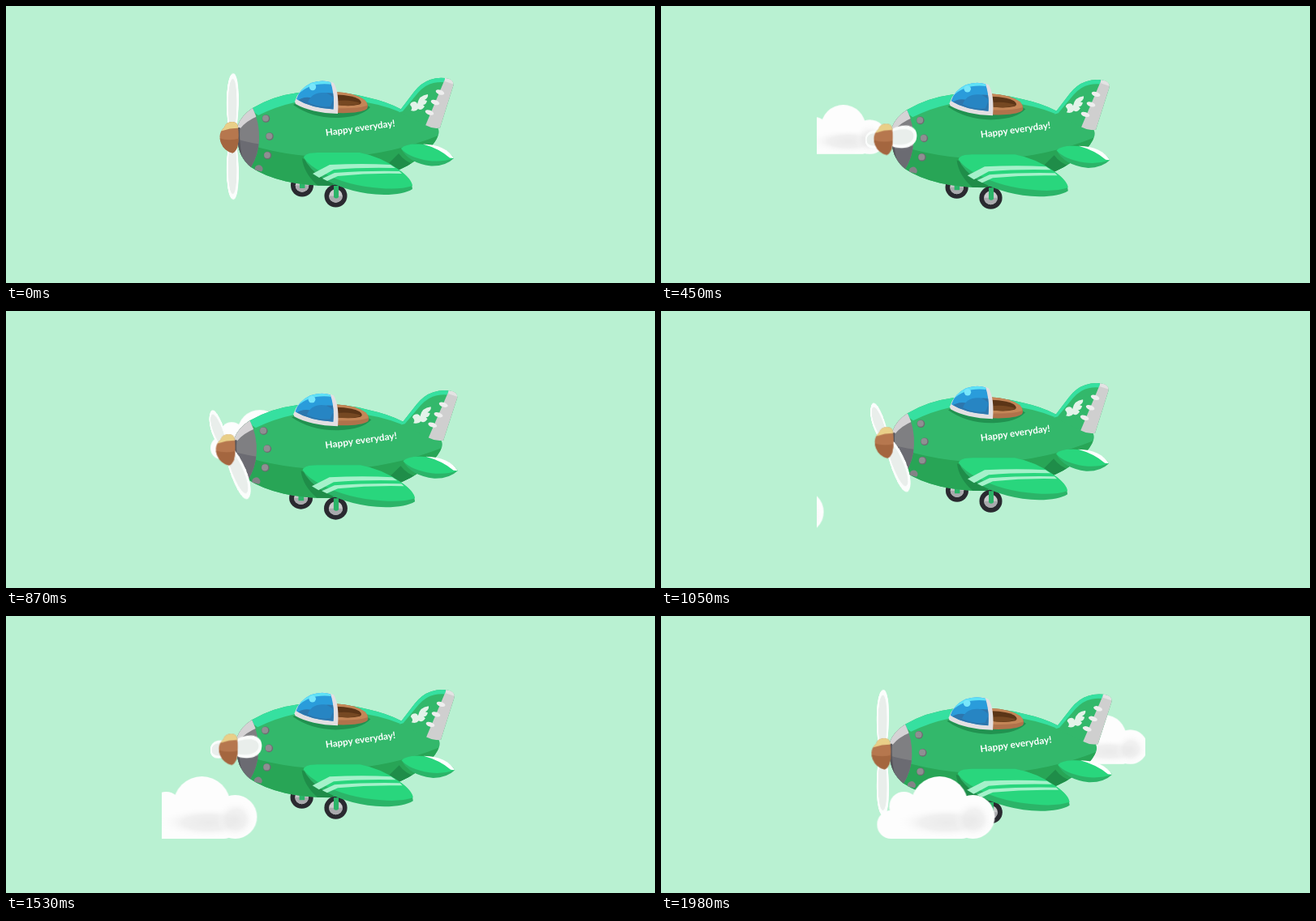
An HTML page for the animation above (2.01 s loop, 800 by 342 pixels).

```html
<!DOCTYPE html>
<html lang="en">
<head>
<meta charset="utf-8">
<title>Little plane</title>
<style>
  html, body { margin: 0; width: 100%; height: 100%; overflow: hidden; background: #b9f1d2; }
  .stage, .plane, .hub, .layer { position: absolute; left: 0; top: 0; width: 800px; height: 342px; }
  .stage { overflow: hidden; }
  .sky { position: absolute; left: 192px; top: 0; width: 405px; height: 342px; overflow: hidden; }
  .sky svg { position: absolute; left: -192px; top: 0; width: 800px; height: 342px; overflow: visible; }

  .plane { transform-origin: 408px 0; animation: bob 270ms ease-in-out infinite alternate; }
  .hub { animation: pull 270ms ease-in-out infinite alternate; }
  .prop { transform-origin: 279px 161px; animation: spin 180ms linear infinite; }
  .blades { transform-origin: 279px 161px; animation: thin 180ms linear infinite; }
  .far { animation: far 2010ms linear infinite; }
  .near { animation: near 2010ms linear infinite; }

  @keyframes bob { to { transform: translateY(10.2px) scaleX(1.037); } }
  @keyframes pull { to { transform: translateX(-3px); } }
  @keyframes spin {
    0% { transform: perspective(355px) rotateY(-67deg) rotateZ(0deg); }
    16.667% { transform: perspective(355px) rotateY(-67deg) rotateZ(50deg); }
    50% { transform: perspective(355px) rotateY(-67deg) rotateZ(88deg); }
    83.333% { transform: perspective(355px) rotateY(-67deg) rotateZ(130deg); }
    100% { transform: perspective(355px) rotateY(-67deg) rotateZ(180deg); }
  }
  @keyframes thin {
    0%, 100% { transform: scaleX(1); }
    16.667%, 83.333% { transform: scaleX(.85); }
    50% { transform: scaleX(.64); }
  }
  @keyframes far { from { transform: translateX(130.2px); } to { transform: translateX(552.3px); } }
  @keyframes near { from { transform: translateX(-105.5px); } to { transform: translateX(350.2px); } }

  text { font: 700 11.6px Lato, "Open Sans", sans-serif; fill: #fff; }
</style>
</head>
<body>
<div class="stage">

  <div class="sky"><svg viewBox="0 0 800 342">
    <defs>
      <radialGradient id="shade">
        <stop offset="0" stop-color="#e6e6e6"/>
        <stop offset=".5" stop-color="#e9e9e9" stop-opacity=".8"/>
        <stop offset="1" stop-color="#fff" stop-opacity="0"/>
      </radialGradient>
      <!-- The dome sits at x = 0, the flat bottom at y = 0. -->
      <g id="cloud">
        <g fill="#fdfdfd">
          <circle cx="41" cy="-27" r="27"/>
          <rect x="-77" y="-35" width="121" height="35" rx="17"/>
          <circle cx="-44" cy="-40" r="18"/>
          <circle cy="-42" r="35"/>
        </g>
        <ellipse cx="8" cy="-20" rx="62" ry="19" fill="url(#shade)" opacity=".8"/>
        <circle cx="42" cy="-24" r="24" fill="url(#shade)" opacity=".7"/>
      </g>
    </defs>
    <g class="far"><use href="#cloud" transform="translate(0 183) scale(.79)"/></g>
  </svg></div>

  <div class="plane">
    <svg class="layer" viewBox="0 0 800 342">
      <defs>
        <g id="wheel">
          <circle r="14" fill="#2a2a30"/>
          <circle r="8.3" fill="#c9c9cb"/>
          <path d="M-8.300 0A8.300 8.300 0 0 0 8.300 0Z" fill="#a9a9ad"/>
        </g>
        <g id="rivet">
          <circle r="4.800" fill="#6c6c70"/><circle cx="-.5" cy="-.4" r="3.900" fill="#8f8f92"/>
        </g>
        <clipPath id="hull">
          <path d="M285.500 148Q290 135 304 126Q329 111 360 107Q405 102 446 113Q469 118 486 127L530 148Q535 152 533 159Q530 168 520 178Q505 193 487 201Q455 217 410 221.500Q375 223 345 216.500Q318 210 302 199Q287 187 285.500 166Z"/>
        </clipPath>
        <clipPath id="cowl">
          <path d="M285.500 148Q290 135 304 126Q313 144 312 166Q311 184 302 199Q287 187 285.500 166Z"/>
        </clipPath>
        <clipPath id="glass">
          <path d="M358 115Q362 102 376 95Q389 90.500 400 94Q405 108 403.500 127.500Q376 126 358 115Z"/>
        </clipPath>
        <clipPath id="fin">
          <path d="M484 131L503 106Q512 94.500 523 91Q535 87 546 90Q552 92 551.500 98L535 150.500Q526 152 518 147.500Z"/>
        </clipPath>
      </defs>

      <use href="#wheel" x="365" y="221.500"/>
      <path d="M362 212h6.500v13h-6.500z" fill="#2bb468"/>

      <g clip-path="url(#hull)">
        <path d="M280 95h260v135H280z" fill="#33b86b"/>
        <path d="M300 127Q330 108 360 104Q405 98 446 110Q470 116 490 127L486 131Q460 120 430 117L356 119Q333 124 311 135Z" fill="#36e0a0"/>
        <path d="M284 166Q340 187 410 187Q480 183 540 157L545 190L480 230L290 230Z" fill="#28a556"/>
        <path d="M354 122Q378 139 410 138Q438 137 449 125L440 120H358Z" fill="#219250"/>
        <path d="M365 188Q367 208 388 225L420 226L400 205Z" fill="#1f8d49"/>
        <path d="M484 182Q492 193 505 196L490 205L470 196Z" fill="#1f8d49"/>
      </g>

      <g clip-path="url(#fin)">
        <path d="M480 84h76v70h-76z" fill="#33b86b"/>
        <path d="M546 84H500L476 134L489 130L508 107Q517 97 527 95Q536 93 546 95Z" fill="#36e0a0"/>
        <path d="M542 88L555 92L540 153L516 150Z" fill="#cfcfcf"/>
        <path d="M541 88L554 88L553 97L541 93Z" fill="#e3e3e3"/>
      </g>

      <g clip-path="url(#cowl)">
        <path d="M284 120h32v84h-32z" fill="#7f7f82"/>
        <path d="M284 164Q298 169 316 171V204H284Z" fill="#6b6b72"/>
        <path d="M280 150L303 122L310 136Q296 142 289 151Z" fill="#d5d3d5"/>
        <path d="M284 150h4.500Q287 166 291 186L284 184Z" fill="#55555b"/>
      </g>
      <use href="#rivet" x="320.500" y="139"/>
      <use href="#rivet" x="325" y="161"/>
      <use href="#rivet" x="322.500" y="184.500"/>
      <path d="M307 202.500A4.800 4.800 0 1 1 315 204.500Z" fill="#838386"/>

      <path d="M405 106Q430 107 442 116Q448 122 445 127Q436 133 408 132Z" fill="#b0724b"/>
      <path d="M405 106Q430 107 442 116Q446 120 445 123Q432 127 408 126Z" fill="#c48657"/>
      <path d="M407 109.500Q427 110 435 115Q440 119 436 121.500Q424 124.500 407 122Z" fill="#5b3517"/>
      <path d="M407 117Q424 115 437 120Q426 124.500 407 122Z" fill="#764822"/>

      <path d="M356 118Q361 102 376 95Q393 89.500 404 95Q411 107 409 133Q376 132 357 121Z" fill="#e3dfe2"/>
      <g clip-path="url(#glass)">
        <path d="M355 88h54v45h-54z" fill="#2a9cdb"/>
        <path d="M355 120Q366 110 378 114Q385 105 407 108V133H355Z" fill="#2d76ad"/>
        <path d="M372 119Q377 106 392 107Q399 108 404 114L400 124Q386 126 372 119Z" fill="#2785c3"/>
        <path d="M355 114Q362 88 402 89L403 97Q376 93 360 109Z" fill="#5fe1f6"/>
        <circle cx="378" cy="100" r="4.200" fill="#78e6fa"/>
      </g>

      <text transform="translate(394.500 160.500) rotate(-8)">Happy everyday!</text>

      <g fill="#eeeeee">
        <ellipse cx="535" cy="106.500" rx="5.500" ry="2.800" transform="rotate(20 535 106.500)"/>
        <ellipse cx="529" cy="119" rx="5.500" ry="2.800" transform="rotate(20 529 119)"/>
        <ellipse cx="522" cy="131.500" rx="5.500" ry="2.800" transform="rotate(20 522 131.500)"/>
        <path d="M498 122Q499 118 504 118Q507 119 507 121Q509 110 520 109Q521 113 516 116L519 117Q518 122 514 122L516 124Q512 130 508 127Q505 131 499 129Q502 126 498 122Z" fill="#e3f3e9"/>
      </g>

      <path d="M487 176Q492 170 508 170.500Q542 171 552 188Q542 198 524 197.500Q496 194 487 176Z" fill="#2bb468"/>
      <path d="M487 176Q492 170 508 170.500Q542 171 552 188Q538 193 521 191Q496 187 487 176Z" fill="#29d67d"/>
      <path d="M514 170.500Q542 171 552 188L547 187.500Q534 176 514 170.500Z" fill="#fff"/>

      <path d="M403 220h7v18q-3.500 3-7 0z" fill="#2bb468"/>
      <use href="#wheel" x="406.500" y="234.500"/>
      <path d="M404 222h6v14q-3 3-6 0z" fill="#2bb468"/>

      <path d="M367 187Q369 181 384 181L436 181Q462 186 484 202Q500 213 501 226Q490 233 466 233Q424 232 391 213Q373 201 367 187Z" fill="#2bb468"/>
      <path d="M367 187Q369 181 384 181L436 181Q462 186 484 202Q500 213 501 222Q486 227 462 225Q420 222 391 206Q373 197 367 187Z" fill="#29d67d"/>
      <g fill="#a5f1ca" transform="translate(0 1)">
        <path d="M378 206L399 195Q440 193 474 195L480 199Q438 198 404 201L386 211Z"/>
        <path d="M390 212L405 205Q448 202 485 203L488 206Q448 205 409 209L396 215Z"/>
      </g>
    </svg>

    <div class="hub">
      <svg class="layer prop" viewBox="0 0 800 342">
        <defs>
          <g id="blade">
            <path d="M-8 0C-25-28-23-77.500 0-77.500S25-28 8 0Z" fill="#fbfdfc"/>
            <path d="M-4 0C-18-26-16-71 0-71S18-26 4 0Z" fill="#e9eeeb"/>
          </g>
        </defs>
        <g class="blades">
          <use href="#blade" transform="translate(279 161)"/>
          <use href="#blade" transform="translate(279 161) rotate(180)"/>
        </g>
      </svg>
    </div>

    <svg class="layer" viewBox="0 0 800 342">
      <clipPath id="cone">
        <path d="M263.500 161Q264 154 269 150Q271 143 279 143Q285 143 286 149Q288 163 285 175Q282 181 279 181.500Q269 179 265 169Q263.500 165 263.500 161Z"/>
      </clipPath>
      <g clip-path="url(#cone)">
        <path d="M260 140h30v44h-30z" fill="#b6774e"/>
        <path d="M260 162Q274 168 290 163V184H260Z" fill="#a4663f"/>
        <path d="M262 155Q270 139 290 141V151Q278 150 267 154Z" fill="#e9cf88"/>
      </g>
    </svg>
  </div>

  <div class="sky"><svg viewBox="0 0 800 342">
    <g class="near"><use href="#cloud" y="275"/></g>
  </svg></div>
</div>

<script>
  // Every motion restarts together when the loop ends.
  const LOOP = 2010, STEP = 30;
  const moves = document.getAnimations();
  moves.forEach(m => m.pause());
  let start;

  function draw(now) {
    start ??= now;
    const t = Math.floor(((now - start) % LOOP) / STEP) * STEP;
    moves.forEach(m => { m.currentTime = t; });
    requestAnimationFrame(draw);
  }
  requestAnimationFrame(draw);
</script>
</body>
</html>
```
